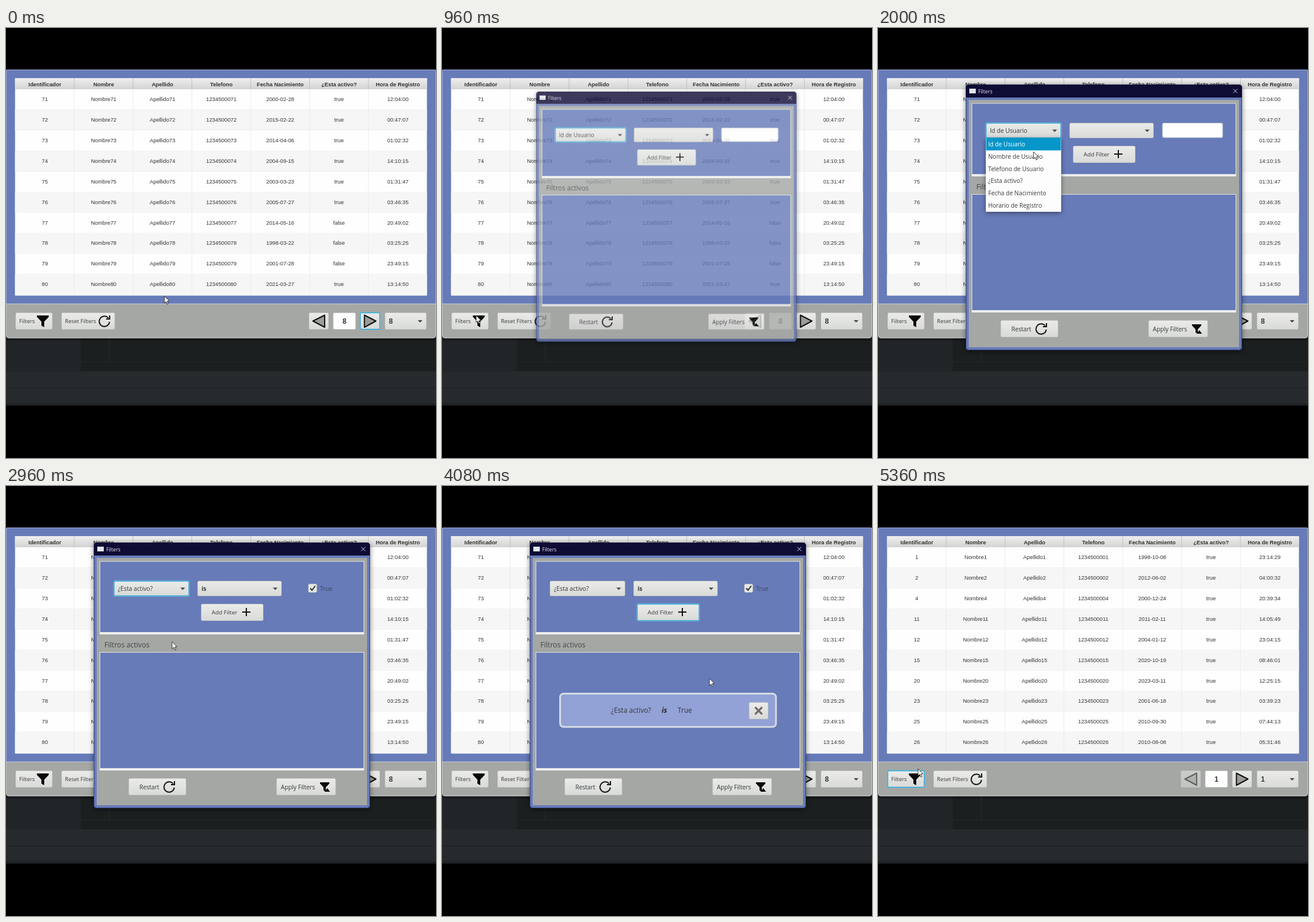
An HTML page with a canvas that plays this animation: 730x730 px, repeating every 5440 ms.

```html
<!DOCTYPE html>
<html lang="es">
<head>
<meta charset="utf-8">
<title>Filters</title>
<style>
html, body { margin: 0; width: 100%; height: 100%; overflow: hidden; background: #000; }
canvas { display: block; }
</style>
</head>
<body>
<canvas id="stage" width="730" height="730"></canvas>
<script>
const LOOP = 5440, STEP = 80;
const SANS = '"Liberation Sans", Arial, sans-serif';
const UI = '"Open Sans", "Noto Sans", sans-serif';
const BLUE = '#677bb9', GRAY = '#a4a7a4', RING = '#2fa6d6';
const screen = document.getElementById('stage').getContext('2d');
const layer = document.createElement('canvas');
layer.width = layer.height = 730;
const dialogCtx = layer.getContext('2d');
let g = screen;

const HEADS = ['Identificador', 'Nombre', 'Apellido', 'Telefono', 'Fecha Nacimiento', '¿Esta activo?', 'Hora de Registro'];
const FIELDS = ['Id de Usuario', 'Nombre de Usuario', 'Telefono de Usuario', '¿Esta activo?', 'Fecha de Nacimiento', 'Horario de Registro'];
const parse = rows => rows.trim().split('\n').map(r => r.trim().split(' '));
const allRows = parse(`
  71 2000-02-28 true 12:04:00
  72 2015-02-22 true 00:47:07
  73 2014-04-06 true 01:02:32
  74 2004-09-15 true 14:10:15
  75 2003-03-23 true 01:31:47
  76 2005-07-27 true 03:46:35
  77 2014-05-16 false 20:49:02
  78 1998-03-22 false 03:25:25
  79 2001-07-28 false 23:49:15
  80 2021-03-27 true 13:14:50`);
const activeRows = parse(`
  1 1998-10-08 true 23:14:29
  2 2012-06-02 true 04:00:32
  4 2000-12-24 true 20:39:34
  11 2011-02-11 true 14:05:49
  12 2004-01-12 true 23:04:15
  15 2020-10-19 true 08:46:01
  20 2023-03-11 true 12:25:15
  23 2001-06-18 true 03:39:23
  25 2010-09-30 true 07:44:13
  26 2010-08-08 true 05:31:46`);

// Pointer path: time, x, y
const PATH = [
  [0, 269, 455], [480, 58, 488], [960, 58, 488], [1040, 190, 370], [1120, 330, 253],
  [1360, 268, 221], [1680, 262, 176], [1920, 262, 176], [2000, 264, 210],
  [2320, 270, 269], [2880, 270, 269], [3440, 486, 185], [3680, 393, 207],
  [3840, 393, 207], [4400, 548, 511], [4480, 480, 498], [4560, 495, 510],
  [4880, 495, 510], [5200, 593, 514], [5280, 250, 473], [5360, 68, 480]
];

const smooth = p => p * p * (3 - 2 * p);

function pointer(t) {
  let i = 1;
  while (i < PATH.length - 1 && t > PATH[i][0]) i++;
  const [t0, x0, y0] = PATH[i - 1], [t1, x1, y1] = PATH[i];
  const p = smooth(Math.max(0, Math.min(1, (t - t0) / (t1 - t0))));
  return { x: x0 + (x1 - x0) * p, y: y0 + (y1 - y0) * p };
}

function rect(x, y, w, h, fill) {
  g.fillStyle = fill;
  g.fillRect(x, y, w, h);
}

function round(x, y, w, h, r, fill, stroke, width = 1) {
  g.beginPath();
  g.roundRect(x, y, w, h, r);
  if (fill) { g.fillStyle = fill; g.fill(); }
  if (stroke) { g.strokeStyle = stroke; g.lineWidth = width; g.stroke(); }
}

function text(s, x, y, font, color = '#363838', align = 'left') {
  g.font = font;
  g.fillStyle = color;
  g.textAlign = align;
  g.fillText(s, x, y);
}

function poly(points, fill, stroke, width = 1) {
  g.beginPath();
  points.forEach(([x, y]) => g.lineTo(x, y));
  g.closePath();
  if (fill) { g.fillStyle = fill; g.fill(); }
  if (stroke) { g.strokeStyle = stroke; g.lineWidth = width; g.lineJoin = 'round'; g.stroke(); }
}

function lines(color, width, ...segments) {
  g.strokeStyle = color;
  g.lineWidth = width;
  g.beginPath();
  for (const [x0, y0, x1, y1] of segments) { g.moveTo(x0, y0); g.lineTo(x1, y1); }
  g.stroke();
}

function fade(y, h, from, to) {
  const f = g.createLinearGradient(0, y, 0, y + h);
  f.addColorStop(0, from);
  f.addColorStop(1, to);
  return f;
}

function button(x, y, w, h, focus) {
  if (focus) round(x - .7, y - .7, w + 1.4, h + 1.4, 3, '#8fc0d6');
  round(x + .5, y + .5, w - 1, h - 1, 2, fade(y, h, '#ebecea', '#d8dad8'), focus ? RING : '#c3c6c3', focus ? 1.4 : 1);
}

function combo(x, y, w, h, label, font, focus) {
  button(x, y, w, h, focus);
  text(label, x + 7, y + h / 2 + 4, font);
  const ax = x + w - 11, ay = y + h / 2 - 1.5;
  poly([[ax - 4, ay], [ax + 4, ay], [ax, ay + 4]], '#444');
}

function funnel(x, y, s) {
  poly([[x, y], [x + s, y], [x + s, y + s * .13], [x + s * .62, y + s * .53], [x + s * .62, y + s],
    [x + s * .38, y + s * .86], [x + s * .38, y + s * .53], [x, y + s * .13]], '#080808');
}

function reload(x, y) {
  g.strokeStyle = '#111';
  g.lineWidth = 2;
  g.beginPath();
  g.arc(x, y, 8.8, .1, 5.6);
  g.stroke();
  lines('#111', 2, [x + 9, y - 10, x + 9, y - 3], [x + 10, y - 4, x + 3, y - 4]);
}

function backdrop() {
  rect(0, 0, 730, 730, '#000');
  rect(0, 520, 730, 121, '#262a2d');
  rect(0, 520, 127, 63, '#212528');
  rect(127, 520, 603, 63, '#1b1f1f');
  rect(0, 526, 730, 5, 'rgba(0,0,0,.25)');
  rect(175, 527, 1, 40, '#292d2d');
  rect(127, 566, 603, 1, '#232727');
  rect(0, 611, 730, 1, '#1d2023');
  rect(0, 637, 730, 4, '#1f2224');
}

function table(rows) {
  const x = 15.4, w = 699.2, col = w / 7, rowH = 34.89;
  rect(x, 85.3, w, 369, '#fdfefd');
  rect(x, 85.3, w, 18.7, fade(85, 19, '#efefef', '#d2d3d2'));
  rows.forEach(([id, date, active, hour], r) => {
    const y = 104 + r * rowH;
    if (r % 2) rect(x, y, w, rowH, '#f5f6f5');
    rect(x, y + rowH - .5, w, .6, '#ededed');
    const cells = [id, 'Nombre' + id, 'Apellido' + id, String(1234500000 + +id), date, active, hour];
    cells.forEach((c, i) => text(c, x + .6 + (i + .5) * col, y + 20.2, '9.3px ' + SANS, '#333535', 'center'));
  });
  HEADS.forEach((h, i) => {
    text(h, x + .6 + (i + .5) * col, 98.6, 'bold 9.3px ' + SANS, '#303232', 'center');
    if (i) {
      rect(x + i * col, 85.3, 1, 18.7, '#bfc0bf');
      rect(x + i * col, 104, 1, 349, '#ebecec');
    }
  });
}

function mainWindow(t) {
  const applied = t >= 4800;
  const page = applied ? '1' : '8';
  const bold = 'bold 12px ' + SANS;
  g.save();
  g.beginPath();
  g.roundRect(0, 70.6, 730, 456, [2, 2, 5, 5]);
  g.clip();
  rect(0, 70, 730, 398, BLUE);
  rect(0, 468, 730, 60, GRAY);
  rect(0, 467.8, 730, 1, '#c9ced8');
  round(.3, 71, 729.4, 455.2, [2, 2, 5, 5], null, 'rgba(225,228,235,.6)');
  rect(0, 525.6, 730, 1, '#d2d5d4');
  g.restore();
  table(applied ? activeRows : allRows);

  button(16, 483, 63, 29, (t >= 560 && t < 880) || t >= 4960);
  text('Filters', 22.5, 501, '9.4px ' + UI);
  funnel(52.5, 488, 20);
  button(94, 483, 91, 29);
  text('Reset Filters', 100, 501, '9.4px ' + UI);
  reload(167, 498);

  g.globalAlpha = applied ? .55 : 1;
  button(514, 483, 34, 29);
  poly([[521, 497.5], [541, 487.5], [541, 508]], '#9b9d9b', '#111', 2);
  g.globalAlpha = 1;
  round(555.5, 483.5, 38, 28, 2, '#fdfefd', '#c5c8c5');
  text(page, 574.5, 502, bold, '#333', 'center');
  button(601, 483, 34, 29, t < 560);
  poly([[628, 497.5], [608.5, 487.5], [608.5, 508]], '#9b9d9b', '#111', 2);
  combo(643, 483, 71, 29, page, bold);
}

function popup(t) {
  const hover = Math.max(0, Math.min(5, Math.floor((pointer(t - STEP).y - 187) / 20.8)));
  g.save();
  g.shadowColor = 'rgba(0,0,0,.45)';
  g.shadowBlur = 8;
  g.shadowOffsetY = 2;
  rect(183, 187, 128, 125, '#fcfdfc');
  g.restore();
  FIELDS.forEach((f, i) => {
    const y = 187 + i * 20.75;
    if (i === hover) rect(183.5, y, 127, 20.75, '#0796c9');
    text(f, 187, y + 14.2, '10.1px ' + UI, i === hover ? '#fff' : '#3a3c3c');
  });
}

function panel(y, h) {
  rect(159, y, 449, h, '#dfe3e4');
  rect(160, y + 1, 447, h - 5, BLUE);
  rect(159, y + h - 4, 449, 4, '#eceeed');
}

function chip() {
  round(200.5, 352.5, 366.5, 56.5, 6, '#92a1d6', '#d6dbe2', 3);
  text('¿Esta activo?', 287, 385, '11.7px ' + UI);
  text('is', 373, 385, 'italic bold 11.7px ' + UI, '#222');
  text('True', 400, 385, '11.7px ' + UI);
  button(521, 367, 33, 29);
  lines('#756a66', 3.2, [531.5, 375.5, 543.5, 387.5], [543.5, 375.5, 531.5, 387.5]);
}

function dialog(t) {
  const font = '10.2px ' + UI;
  const chosen = t >= 2960, added = t >= 3920;
  g.save();
  g.shadowColor = 'rgba(0,0,0,.5)';
  g.shadowBlur = 9;
  g.shadowOffsetY = 2;
  round(149, 96, 469, 451, 5, BLUE);
  g.restore();
  round(149.5, 96.5, 468, 450, 5, null, '#34427c');
  round(149, 96, 469, 22, [5, 5, 0, 0], '#0e0b35');
  rect(155, 103, 11, 8, '#dfe7ee');
  text('Filters', 170, 110.8, '8.6px ' + UI, '#e8e8ef');
  lines('#dcdce4', 1, [603, 103.5, 610, 110.5], [610, 103.5, 603, 110.5]);
  rect(154, 122, 459, 420, GRAY);
  panel(127.5, 124.5);
  text('Filtros activos', 167, 273.5, '12.1px ' + UI, '#434646');
  panel(282, 201);

  combo(183, 161, 128, 26, FIELDS[chosen ? 3 : 0], font, t < 3760);
  combo(325, 161, 143, 26, chosen ? 'is' : '', 'bold 10.2px ' + UI);
  if (chosen) {
    round(513.5, 166.5, 14, 14, 2, '#e6e8e6', '#bfc3c6');
    g.strokeStyle = '#2d2f2f';
    g.lineWidth = 2;
    g.beginPath();
    g.moveTo(516.5, 173.5);
    g.lineTo(519.5, 177);
    g.lineTo(525, 169.5);
    g.stroke();
    text('True', 533, 177.5, font, '#3d4560');
  } else {
    round(483, 161.5, 102, 24.5, 2, '#fdfefd', '#c9cdd6');
  }
  button(331, 200, 106, 29, t >= 3760 && t < 4720);
  text('Add Filter', 349, 217.8, '9.8px ' + UI);
  lines('#111', 2, [401, 214, 415, 214], [408, 207, 408, 221]);

  if (added) chip();
  button(208, 496, 98, 29);
  text('Restart', 226.5, 514.5, '10.1px ' + UI);
  reload(277, 511);
  button(459, 496, 101, 29, t >= 4720);
  text('Apply Filters', 466.5, 514.5, font);
  funnel(533, 503, 16);
  poly([[541, 519], [550, 519], [545.5, 513]], '#080808');
  if (t >= 2000 && !chosen) popup(t);
}

// Fades the dialog while scaling it about a fixed point
function showDialog(t) {
  if (t < 880 || t >= 4960) return;
  const px = 337, py = 303;
  const p = t < 4800 ? Math.min(1, (t - 800) / 320) : 1 - (t - 4720) / 240;
  const s = .884 + .116 * smooth(p);
  g = dialogCtx;
  g.clearRect(0, 0, 730, 730);
  dialog(t);
  g = screen;
  g.save();
  g.globalAlpha = Math.min(1, p * 1.62);
  g.translate(px, py);
  g.scale(s, s);
  g.drawImage(layer, -px, -py);
  g.restore();
}

function drawPointer(t) {
  const { x, y } = pointer(t);
  const hand = t > 2960 && t < 4400 && x > 331 && x < 437 && y > 200 && y < 229;
  g.save();
  g.translate(x, y);
  if (hand) {
    poly([[-1, 0], [1, 0], [1.5, 6], [7, 8], [7, 12], [5, 16], [-1, 16], [-5, 10], [-4, 8.5], [-1.5, 10.5]], '#fff', '#222', 1);
    lines('#333', .7, [3, 7, 3, 10], [5, 7.7, 5, 10]);
  } else {
    poly([[0, 0], [0, 12], [2.8, 9.6], [4.8, 14], [6.6, 13.1], [4.7, 8.9], [8.4, 8.7]], '#fff', '#222', .9);
  }
  g.restore();
}

function frame(now) {
  const t = Math.floor((now % LOOP) / STEP) * STEP;
  backdrop();
  mainWindow(t);
  showDialog(t);
  drawPointer(t);
  requestAnimationFrame(frame);
}
requestAnimationFrame(frame);
</script>
</body>
</html>
```
